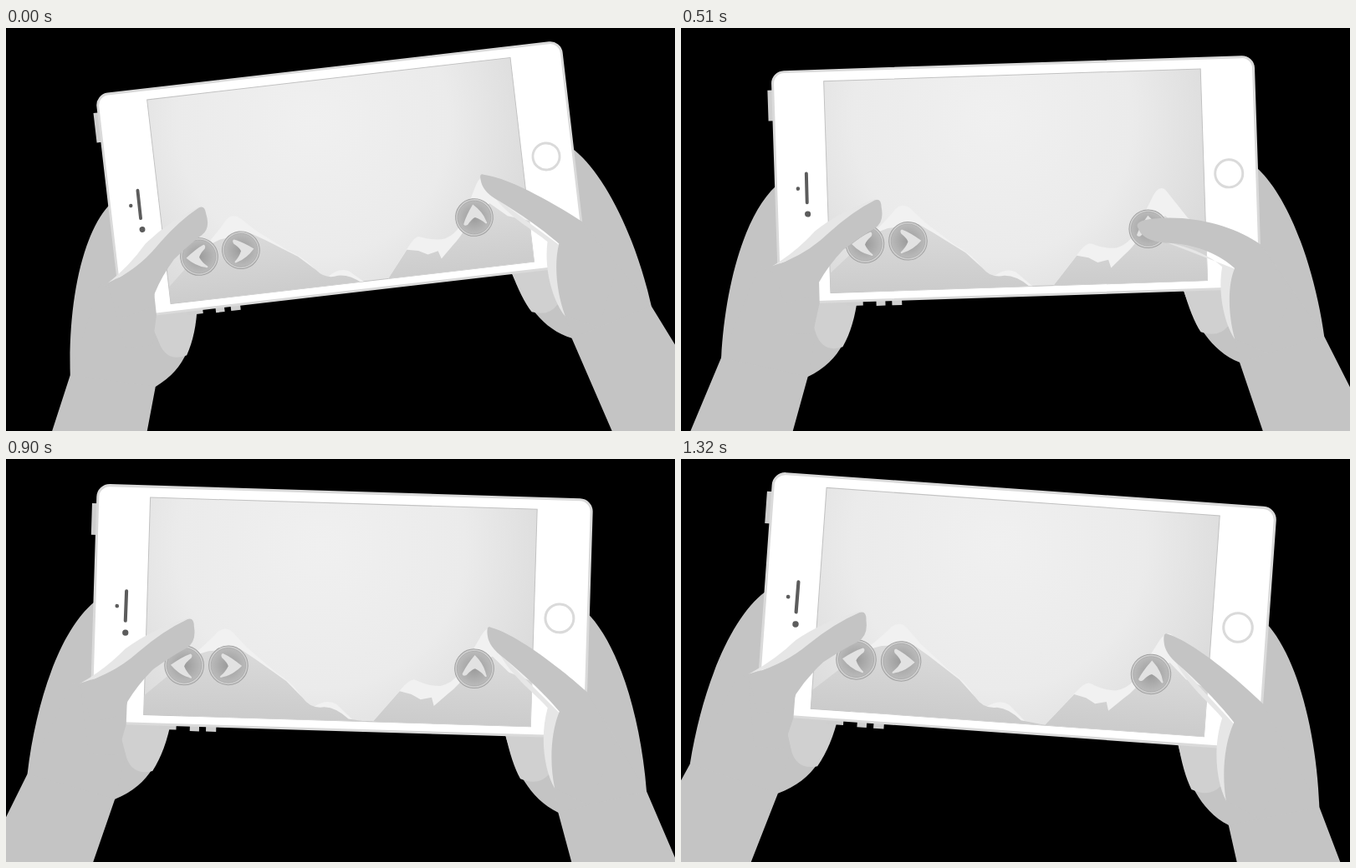
An HTML page for the animation above (1350 ms loop, 800 by 483 pixels).

```html
<!DOCTYPE html>
<html lang="en">
<head>
<meta charset="utf-8">
<title>Handheld game</title>
<style>
  html, body { margin: 0; height: 100%; overflow: hidden; background: #000; }
  svg { display: block; width: 100vw; height: 100vh; }
  .skin { fill: #c4c4c4; }
  .palm { fill: #d0d0d0; }
  .shine { fill: #e6e6e6; }
  .metal { fill: #cfcfcf; }
  .ink { fill: #5c5c5c; }
</style>
</head>
<body>
<svg viewBox="0 0 800 483">
  <defs>
    <radialGradient id="glow" gradientUnits="userSpaceOnUse" cx="375" cy="105" r="340">
      <stop offset="0" stop-color="#f0f0f0"/>
      <stop offset=".5" stop-color="#ebebeb"/>
      <stop offset="1" stop-color="#d2d2d2"/>
    </radialGradient>
    <linearGradient id="rock" gradientUnits="userSpaceOnUse" x1="0" y1="225" x2="0" y2="315">
      <stop offset="0" stop-color="#dcdcdc"/>
      <stop offset="1" stop-color="#cbcbcb"/>
    </linearGradient>
    <radialGradient id="disc">
      <stop offset="0" stop-color="#9a9a9a"/>
      <stop offset="1" stop-color="#bababa"/>
    </radialGradient>
    <clipPath id="screen"><rect id="window" x="172.3" y="55" width="455.5" height="256.5"/></clipPath>
    <g id="button">
      <circle r="23" fill="#cecece" stroke="#a2a2a2"/>
      <circle r="20.5" fill="url(#disc)" stroke="#aaa" stroke-width=".8"/>
    </g>
    <path id="arrow" fill="#e2e2e2" d="M16 0Q3-10-7-14Q-10-13-8-9Q-1-3 0 1Q-3 8-9 13Q-10 16-6 14Q6 11 16 0Z"/>
  </defs>

  <g class="body">
    <path class="skin" d="M130 165L110 182.5C72 216 46 300 39 388L-100 698L60 687L143 414C185 395 196 362 205 320L205 250Z"/>
    <path class="palm" d="M140 318H206C202 343 196 362 186 379Q162 386 154 362Z"/>
    <path class="skin" d="M670 165L694 177C730 214 758 295 768 381L910 682L749 682L665 410C630 395 612 360 599 320V250Z"/>
    <path class="palm" d="M599 318H665V368L652 366Q640 380 619 372Q608 354 599 318Z"/>
    <g transform="rotate(-.4 401 183)">
      <path class="metal" d="M104 64h8v37h-8zM191 322h20v6h-20zM227 322h11v7h-11zM246 322h12v7h-12z"/>
      <rect x="110.5" y="42.2" width="581.3" height="280" rx="14" fill="#fff" stroke="#dadada" stroke-width="3"/>
      <rect x="172.3" y="55" width="455.5" height="256.5" fill="url(#glow)" stroke="#c2c2c2"/>
    </g>
    <circle cx="658" cy="181" r="16.7" fill="none" stroke="#dadada" stroke-width="3"/>
    <path d="M147.5 168V203" stroke="#5c5c5c" stroke-width="4" stroke-linecap="round"/>
    <circle class="ink" cx="137" cy="186" r="2.3"/>
    <circle class="ink" cx="148" cy="217" r="3.6"/>
  </g>

  <g clip-path="url(#screen)">
    <g id="game">
      <path fill="#f1f1f1" d="M215 252L225 243Q245 225 255 213Q264 205 273 213L290 230L325 258Q345 270 353 281Q364 298 372 297Q386 287 398 293L418 311L441 313L474 272Q484 259 490 261Q506 268 520 267Q534 263 541 252L566 205Q575 190 583 201L607 233L640 255V330H215Z"/>
      <path fill="url(#rock)" d="M150 310L225 243L245 236L282 232L300 243L338 268L358 287Q368 300 384 297Q398 297 413 310L441 313L472 275L486 278L497 284L510 281L513 291L530 275Q545 263 560 236L580 230L600 248L640 262V330H150Z"/>
      <g transform="translate(217 254)"><use href="#button"/><use href="#arrow" transform="scale(-1 1)"/></g>
      <g transform="translate(269 252)"><use href="#button"/><use href="#arrow"/></g>
      <g transform="translate(559 245)"><use href="#button"/><use href="#arrow" transform="rotate(-90)"/></g>
    </g>
  </g>

  <g class="body">
    <path class="skin" d="M88 279L143 302V325L154 362L143 414L39 388Z"/>
    <g id="leftGrip">
      <path class="skin" d="M107 279L150 285L163 300V325Q158 345 154 362L120 362Z"/>
      <g id="leftThumb">
        <path class="shine" d="M107 279Q137 262 160 238Q192 214 235 201L190 250Z"/>
        <path class="skin" d="M107 279Q146 268 175 242Q205 216 233 203Q241 200 241 212Q244 230 232 237Q215 246 193 262Q175 280 163 300L158 316L120 325Z"/>
      </g>
    </g>
    <path class="skin" d="M694 267L768 381L665 410L660 382Z"/>
    <g id="rightGrip">
      <path class="shine" id="rightShine"/>
      <path class="skin" id="rightThumb"/>
    </g>
  </g>
</svg>
<script>
const $ = id => document.getElementById(id);
const LOOP = 1350, STEP = 30, LAST = 1320;

// Similarity transforms [a, b, e, f] at the start and end of the turn; identity at MID.
const MID = .5725;
const BODY = [[.9544, -.1042, -.86, 49.8], [1.0316, .0807, 1.83, -37.8]];
const GAME = [[.9649, -.112, -6.85, 53.2], [1.0286, .0782, 6.16, -37.8]];

// time, left shift, left angle, right skew, right reach, right drop
const THUMBS = [
  [0, -9, -2.4, 0, 0, 0],
  [150, 0, 8, -11, 1, .72],
  [360, -7, -.5, 0, 1, 1],
  [660, 0, 0, 0, 1, .97],
  [900, -10, -2, 0, 0, 0],
  [1080, -20, 4, 0, .83, .88],
  [1320, -9, -2.4, 0, 0, 0]
];

const EDGE = 'C652 318 653 355 660 382';
const THUMB = [
  `M694 267C670 247 612 203 578 195Q572 192 574 204Q576 218 594 230C620 250 645 272 662 291${EDGE}L700 400L730 330Z`,
  `M694 268C665 246 615 230 566 234Q540 236 547 246Q552 262 585 264C620 267 645 280 662 296${EDGE}L700 400L730 330Z`
];
const SHINE = [
  'M588 224C606 254 632 270 648 287C640 320 646 360 660 382L670 300Z',
  'M578 262C612 270 634 281 647 294C641 320 646 360 660 382L670 300Z'
];

function matrix([start, end], p) {
  const w0 = (p - MID) * (p - 1) / MID;
  const w1 = p * (p - MID) / (1 - MID);
  const [a, b, e, f] = start.map((v, i) => v * w0 + end[i] * w1 + (i ? 0 : 1 - w0 - w1));
  return `matrix(${a} ${b} ${-b} ${a} ${e} ${f})`;
}

function thumbPose(t) {
  const i = Math.max(1, THUMBS.findIndex(key => key[0] >= t));
  const from = THUMBS[i - 1], to = THUMBS[i];
  const u = (t - from[0]) / (to[0] - from[0]);
  const k = u * u * (3 - 2 * u);
  return from.map((v, j) => v + (to[j] - v) * k).slice(1);
}

function morph([rest, press], kx, ky) {
  const goal = press.match(/\d+/g);
  let i = 0;
  return rest.replace(/\d+/g, v => {
    const k = i % 2 ? ky : kx;
    return +v + (goal[i++] - v) * k;
  });
}

function draw(now) {
  const t = Math.floor(now % LOOP / STEP) * STEP;
  const u = t / LAST;
  const turn = u + u * (1 - u) * (.78 * u - .1);
  const body = matrix(BODY, turn);
  for (const g of document.querySelectorAll('.body')) g.setAttribute('transform', body);
  $('window').setAttribute('transform', body + ' rotate(-.4 401 183)');
  $('game').setAttribute('transform', matrix(GAME, turn));

  const [shift, angle, skew, reach, drop] = thumbPose(t);
  $('leftGrip').setAttribute('transform', `translate(${shift})`);
  $('leftThumb').setAttribute('transform', `rotate(${angle} 107 279)`);
  $('rightGrip').setAttribute('transform', `translate(660 382) skewX(${skew}) translate(-660 -382)`);
  $('rightThumb').setAttribute('d', morph(THUMB, reach, drop));
  $('rightShine').setAttribute('d', morph(SHINE, reach, drop));
}

const begin = performance.now();
function tick() {
  draw(performance.now() - begin);
  requestAnimationFrame(tick);
}
tick();
</script>
</body>
</html>
```
